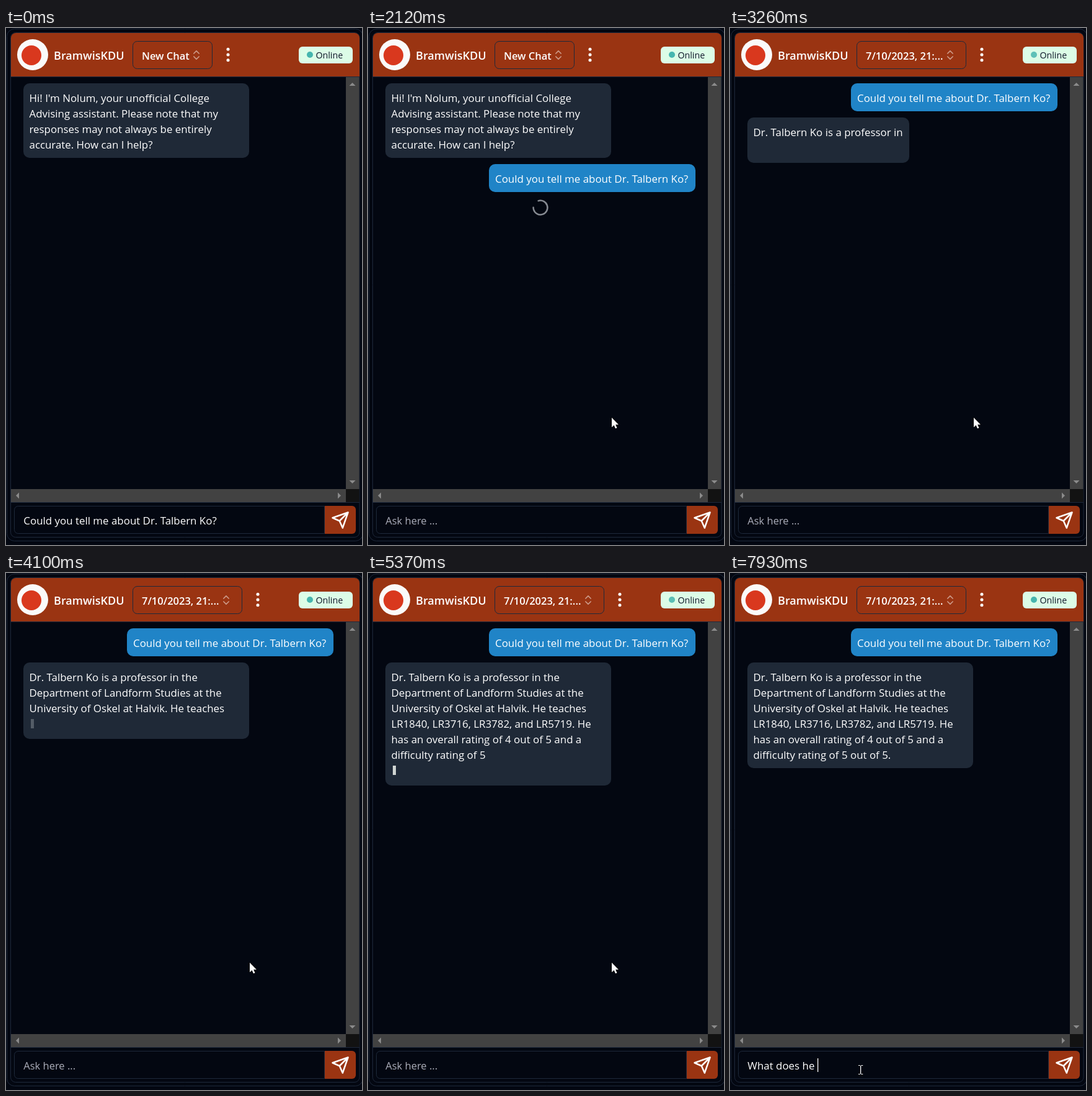
Animation of 574 by 832 pixels, one loop 8 s. Source, as an HTML page with a canvas:

```html
<!DOCTYPE html>
<html lang="en">
<head>
<meta charset="utf-8">
<title>Advising chat</title>
<style>
  html, body { margin: 0; width: 100%; height: 100%; overflow: hidden; background: #030711; }
  canvas { display: block; }
</style>
</head>
<body>
<canvas id="stage" width="574" height="832"></canvas>
<script>
const ctx = document.getElementById('stage').getContext('2d');
const LOOP = 8000, TICK = 141.6;
const BG = '#030711', LINE = '#1e293b', RUST = '#9a3412', PANEL = '#1f2937';
const BLUE = '#2084c7', WHITE = '#fff', TRACK = '#424242';
const FAMILY = '"Open Sans", "Noto Sans", sans-serif';
const BODY = '16.9px ' + FAMILY;
const BOLD = '600 16.5px ' + FAMILY;

const QUESTION = 'Could you tell me about Dr. Talbern Ko?';
const GREETING = [
  "Hi! I'm Nolum, your unofficial College",
  'Advising assistant. Please note that my',
  'responses may not always be entirely',
  'accurate. How can I help?'
];
const ANSWER = [
  'Dr. Talbern Ko is a professor in the',
  'Department of Landform Studies at the',
  'University of Oskel at Halvik. He teaches',
  'LR1840, LR3716, LR3782, and LR5719. He',
  'has an overall rating of 4 out of 5 and a',
  'difficulty rating of 5 out of 5.'
];
const FOLLOW_UP = 'What does he ';

// Moments, counted in ticks
const SEND = 8, BUBBLE = 17, OPEN = 19, STREAM = 20, DONE = 40, FOCUS = 50, TYPE = 51;

// Keys: [tick, value, ...]
const POINTER = [
  [1, 533, 825], [2, 534, 817], [3, 534, 813], [4, 534, 813], [5, 532, 806],
  [7, 530, 796], [8, 530, 796], [9, 508, 768], [11, 408, 648], [12, 393, 627],
  [43, 393, 627], [44, 440, 672], [45, 518, 742], [46, 549, 778],
  [47, 460, 792], [48, 320, 798], [49, 228, 799], [50, 210, 799]
];
const BLINK = [
  [17, 0.9], [20, 0.5], [21.5, 1], [23, 0], [26, 1], [29, 0.28],
  [32, 1], [35, 0], [38, 0.92], [40, 0.3]
];

function at(keys, k) {
  if (k <= keys[0][0]) return keys[0].slice(1);
  const i = keys.findIndex(key => key[0] >= k);
  if (i < 0) return keys[keys.length - 1].slice(1);
  const a = keys[i - 1], b = keys[i];
  const f = (k - a[0]) / (b[0] - a[0]);
  return a.slice(1).map((v, n) => v + (b[n + 1] - v) * f);
}

function rect(x, y, w, h, color) {
  ctx.fillStyle = color;
  ctx.fillRect(x, y, w, h);
}

function box(x, y, w, h, r, fill, stroke) {
  ctx.beginPath();
  ctx.roundRect(x, y, w, h, r);
  if (fill) { ctx.fillStyle = fill; ctx.fill(); }
  if (stroke) { ctx.strokeStyle = stroke; ctx.lineWidth = 1; ctx.stroke(); }
}

function disc(x, y, r, color) {
  ctx.fillStyle = color;
  ctx.beginPath();
  ctx.arc(x, y, r, 0, Math.PI * 2);
  ctx.fill();
}

function text(str, x, y, font = BODY, color = WHITE) {
  ctx.font = font;
  ctx.fillStyle = color;
  ctx.fillText(str, x, y);
}

function width(str) {
  ctx.font = BODY;
  return ctx.measureText(str).width;
}

// Strokes an icon designed on a 24 unit grid
function icon(path, x, y, scale, color, alpha = 1) {
  ctx.save();
  ctx.translate(x, y);
  ctx.scale(scale, scale);
  ctx.globalAlpha = alpha;
  ctx.strokeStyle = color;
  ctx.lineWidth = 2;
  ctx.lineCap = ctx.lineJoin = 'round';
  ctx.stroke(new Path2D(path));
  ctx.restore();
}

function arrow(x, y, dx, dy) {
  ctx.fillStyle = '#8b8b8b';
  ctx.beginPath();
  ctx.moveTo(x + dx * 2.5, y + dy * 2.5);
  ctx.lineTo(x - dx * 2.5 + dy * 5, y - dy * 2.5 + dx * 5);
  ctx.lineTo(x - dx * 2.5 - dy * 5, y - dy * 2.5 - dx * 5);
  ctx.fill();
}

function drawFrame() {
  rect(0, 0, 574, 832, BG);
  box(1.5, 1.5, 574, 824, 12, null, LINE);
  box(7.5, 7.5, 562.5, 812, 8, null, LINE);
  rect(8, 763, 562, 1, LINE);
  rect(548, 79, 21.5, 663, TRACK);
  rect(8, 742, 540, 21, TRACK);
  rect(548, 742, 21.5, 21, '#121212');
  arrow(558.5, 90.5, 0, -1);
  arrow(558.5, 730.5, 0, 1);
  arrow(18.5, 752.5, -1, 0);
  arrow(537.5, 752.5, 1, 0);
}

function drawHeader(k) {
  const saved = k >= OPEN, shift = saved ? 48 : 0;
  box(8, 8, 562, 70, [8, 8, 0, 0], RUST);
  rect(8, 78, 562, 1, LINE);
  disc(43, 43, 25, '#fafafa');
  disc(41, 44, 16, '#d9381e');
  text('BramwisKDU', 77, 50.5, '600 18px ' + FAMILY);

  box(204.5, 21.5, 128 + shift, 44, 7, null, LINE);
  text(saved ? '7/10/2023, 21:...' : 'New Chat', 219, 50.5, BOLD);
  icon('M7 15l5 5 5-5M7 9l5-5 5 5', 297 + shift, 33.5, 0.833, WHITE, 0.5);
  for (let i = -1; i < 2; i++) disc(358 + shift, 43 + i * 8.75, 2.5, WHITE);

  box(472, 30, 87, 27, 6, '#dcfce7');
  ctx.globalAlpha = 0.9 + 0.1 * Math.cos(k * TICK / 1000 * Math.PI);
  disc(490, 43, 5, '#45b5ae');
  ctx.globalAlpha = 1;
  text('Online', 499.5, 48.5, '500 14.2px ' + FAMILY, '#0f172a');
}

function drawLines(lines, x, top) {
  lines.forEach((line, i) => text(line, x, top + 30 + i * 25));
}

function drawQuestion(top) {
  box(195, top, 333, 45, 10, BLUE);
  text(QUESTION, 205, top + 30);
}

function drawSpinner(k) {
  const mid = (k - 15) * TICK / 1000 * Math.PI * 2 - 2.5;
  ctx.strokeStyle = '#868a92';
  ctx.lineWidth = 2.5;
  ctx.lineCap = 'round';
  ctx.beginPath();
  ctx.arc(278, 289, 11.4, mid + 0.63, mid - 0.63 + Math.PI * 2);
  ctx.stroke();
}

// First n words, keeping the line breaks
function reveal(lines, n) {
  const shown = [];
  for (const line of lines) {
    if (n <= 0) break;
    const words = line.split(' ');
    shown.push(words.slice(0, n).join(' '));
    n -= words.length;
  }
  return shown;
}

function drawAnswer(k, top) {
  const done = k >= DONE;
  const lines = reveal(ANSWER, done ? 99 : Math.round((k - STREAM) * 7 / 3));
  const n = lines.length;
  const w = n > 1 ? 364 : n ? Math.round(width(lines[0])) + 20 : 29;
  box(28, top, w, 25 * n + (done ? 20 : 48), 10, PANEL);
  drawLines(lines, 37.5, top);
  if (done) return;
  ctx.globalAlpha = at(BLINK, k)[0];
  rect(40, top + 16 + 25 * n, 5, 15, '#dfe3e0');
  ctx.globalAlpha = 1;
}

function drawChat(k) {
  if (k >= OPEN) {
    drawQuestion(89);
    drawAnswer(k, 144);
    return;
  }
  box(28, 89, 364, 120, 10, PANEL);
  drawLines(GREETING, 37.5, 89);
  if (k < SEND) return;
  drawQuestion(219);
  drawSpinner(k);
  if (k >= BUBBLE) drawAnswer(k, 312);
}

function drawInput(k) {
  box(13.5, 769.5, 500, 44, [6, 0, 0, 6], null, LINE);
  box(514, 769, 50, 45, [0, 6, 6, 0], RUST);
  icon('M22 2l-7 20-4-9-9-4ZM22 2L11 13', 524, 777, 1.25, WHITE);

  const x = 28.3;
  const typed = k < SEND ? QUESTION
    : FOLLOW_UP.slice(0, Math.max(0, Math.round((k - TYPE) * 2.6)));
  if (typed) text(typed, x, 799);
  else text('Ask here ...', x, 799, '16.5px ' + FAMILY, '#acaeba');
  if (k >= FOCUS) rect(Math.round(x + width(typed)), 781, 1.3, 22, WHITE);
}

function drawPointer(k) {
  if (k < 1) return;
  const [x, y] = at(POINTER, k);
  if (y > 769 && x < 513) {
    rect(x, y - 6, 1.3, 13, WHITE);
    for (const end of [-7, 7]) {
      rect(x - 3, y + end, 3, 1, WHITE);
      rect(x + 1.3, y + end, 3, 1, WHITE);
    }
    return;
  }
  ctx.save();
  ctx.translate(x, y);
  const shape = new Path2D('M0 0V15.5L3.6 12.2 6 17.6 8.5 16.5 6.2 11.3H11Z');
  ctx.lineWidth = 1;
  ctx.strokeStyle = '#000';
  ctx.stroke(shape);
  ctx.fillStyle = '#fff';
  ctx.fill(shape);
  ctx.restore();
}

const start = performance.now();

function draw() {
  const t = (performance.now() - start) % LOOP;
  const k = Math.floor((t + 15) / TICK);
  drawFrame();
  drawHeader(k);
  drawChat(k);
  drawInput(k);
  drawPointer(k);
  requestAnimationFrame(draw);
}
draw();
</script>
</body>
</html>
```
